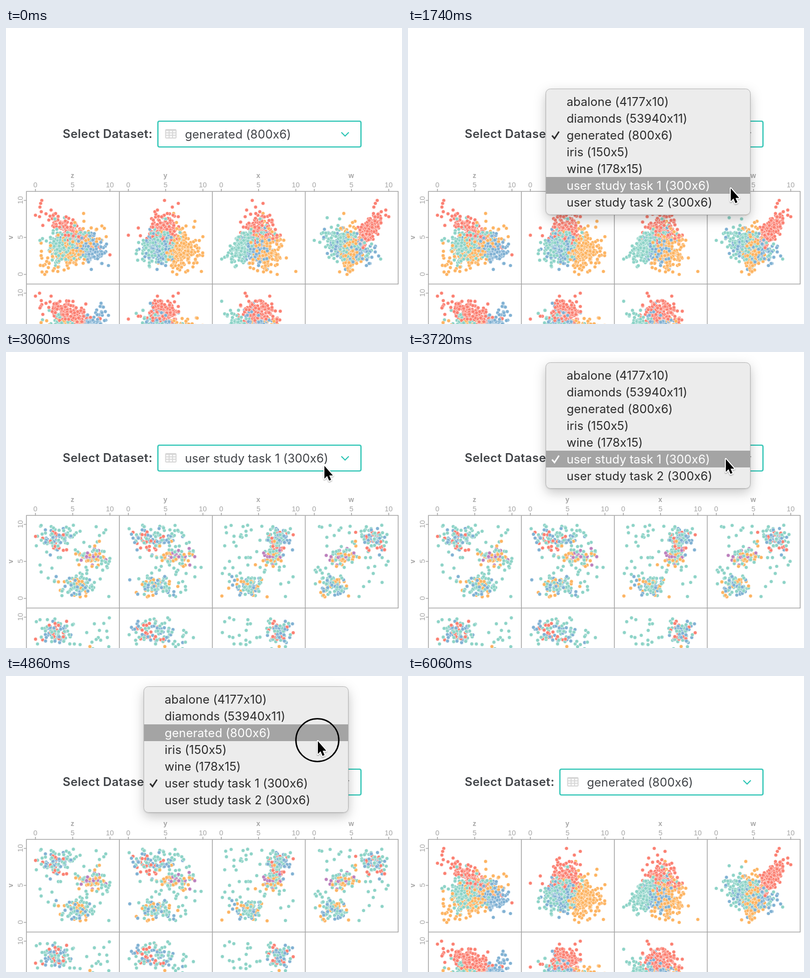
An HTML page with a canvas that plays this animation: 800 px wide and 600 px high, repeating every 6.12 s.

```html
<!DOCTYPE html>
<html lang="en">
<head>
<meta charset="utf-8">
<title>Dataset picker</title>
<style>
html, body { margin: 0; width: 100%; height: 100%; overflow: hidden; background: #fff; }
canvas, svg { position: absolute; left: 0; top: 0; width: 800px; height: 600px; }
svg { overflow: hidden; }
text { font: 24px Inter, "Open Sans", sans-serif; letter-spacing: .08px; fill: #404347; white-space: pre; }
.label { font-weight: 600; letter-spacing: .38px; }
.axis text { font: 14.5px "Liberation Sans", Arial, sans-serif; letter-spacing: 0; fill: #a6a6a6; text-anchor: middle; }
.axis .name { font-weight: bold; font-size: 14px; }
.axis path { fill: none; stroke: #a6a6a6; stroke-width: 1.6; }
#items text { fill: #2b2b2b; }
#items .on { fill: #fff; }
</style>
</head>
<body>
<svg id="stage" viewBox="0 0 800 600">
  <defs>
    <filter id="menuShadow" x="-20%" y="-20%" width="140%" height="150%">
      <feDropShadow dx="0" dy="8" stdDeviation="12" flood-color="#000" flood-opacity=".2"/>
      <feDropShadow dx="0" dy="1" stdDeviation="1" flood-color="#000" flood-opacity=".15"/>
    </filter>
    <filter id="arrowShadow" x="-50%" y="-50%" width="200%" height="200%">
      <feDropShadow dx="0" dy="1.5" stdDeviation="1.3" flood-color="#000" flood-opacity=".35"/>
    </filter>
  </defs>
  <g id="axes" class="axis"></g>

  <text class="label" x="114.5" y="223">Select Dataset:</text>
  <rect x="305" y="187" width="414" height="56" rx="5" fill="#c9f1ec"/>
  <rect x="307" y="189" width="410" height="52" rx="3" fill="#fff" stroke="#2bc4b4" stroke-width="2.200"/>
  <g fill="none" stroke="#d6d6d6" stroke-width="2">
    <rect x="322.500" y="206" width="21" height="17" rx="1.500"/>
    <path d="M322 207.500h22M322 212.500h22M322 217.500h22M329.500 206v17M336.500 206v17"/>
  </g>
  <text id="value" x="361.500" y="224"></text>
  <path id="chevron" d="M677.500 211.500l7.500 7.500 7.500-7.500" fill="none" stroke-width="2.200"/>

  <g id="loader">
    <rect x="127" y="278" width="578" height="96" rx="4" fill="#edefee"/>
    <g id="spinner" fill="#404347"></g>
    <text id="status" x="192.500" y="334"></text>
  </g>

  <g id="menu">
    <rect x="278.500" y="123.500" width="413" height="255" rx="9" fill="#ececec" stroke="#b4b4b4" filter="url(#menuShadow)"/>
    <rect id="bar" x="279" width="412" height="34" fill="#a4a4a4"/>
    <g id="items"></g>
    <path id="check" d="M291 1l5 6 9-14" fill="none" stroke-width="3"/>
  </g>

  <g id="cursor">
    <circle id="ring" r="43.300" fill="none" stroke="#000" stroke-width="2.800"/>
    <path d="M1 2V28L6.500 22.500 10.500 32 14.500 30.300 10.700 21.500H18Z" stroke="#fff" stroke-width="4"
      stroke-linejoin="round" paint-order="stroke" filter="url(#arrowShadow)"/>
  </g>
</svg>
<script>
const LOOP = 6120, STEP = 60, ROW = 34;
const $ = id => document.getElementById(id);
const show = (el, on) => { el.style.display = on ? '' : 'none'; };

const TEAL = '#8dd3c7', RED = '#fb8072', BLUE = '#80b1d3', ORANGE = '#fdb462', PURPLE = '#bc80bd';
const options = ['abalone (4177x10)', 'diamonds (53940x11)', 'generated (800x6)', 'iris (150x5)',
  'wine (178x15)', 'user study task 1 (300x6)', 'user study task 2 (300x6)'];

// Scales of the scatter plot matrix
const CELL = 187.75;
const px = (v, col) => 59.5 + CELL * col + v * 15.05;
const py = (v, row) => 499.5 + 188 * row - v * 15;

function seeded(a) {
  return () => {
    a = a + 0x6D2B79F5 | 0;
    let n = Math.imul(a ^ a >>> 15, 1 | a);
    n = n + Math.imul(n ^ n >>> 7, 61 | n) ^ n;
    return ((n ^ n >>> 14) >>> 0) / 4294967296;
  };
}

// Each point is [color, z, y, x, w, v]
function collect(rand, groups) {
  const normal = (mean, sd) =>
    mean + sd * Math.sqrt(-2 * Math.log(1 - rand())) * Math.cos(2 * Math.PI * rand());
  const points = [];
  for (const [count, make] of groups) {
    for (let left = count; left > 0;) {
      const p = make(normal);
      if (p.slice(1).every(v => v >= 0 && v <= 10)) { points.push(p); left--; }
    }
  }
  for (let i = points.length - 1; i > 0; i--) {
    const j = Math.floor(rand() * (i + 1));
    [points[i], points[j]] = [points[j], points[i]];
  }
  return points;
}

function generated() {
  return collect(seeded(11), [
    [175, n => {
      const v = n(5.8, 1.05);
      return [RED, n(4.7 - 1.1 * (v - 6), .9), n(4.7, .95), n(5, 1.05), n(7.3 + .5 * (v - 6), .6), v];
    }],
    [215, n => {
      const z = n(4.8, 2);
      return [ORANGE, z, n(7, 1.15), n(5.8, 1), n(4.8, .6), n(3.3 + .4 * (z - 4.5), 1.15)];
    }],
    [225, n => {
      const x = n(3.2, 1.15), w = n(4.4 - .8 * (x - 3), 1.1);
      return [TEAL, n(4.1 - .3 * (w - 4.4), 1.4), n(4 - .25 * (w - 4.4), 1), x, w, n(3.8 + .65 * (x - 3), 1)];
    }],
    [172, n => {
      const z = n(7.1, 1.15);
      return [BLUE, z, n(4.2, 1), n(4.9, .9), n(4.9 + .8 * (z - 7.1), 1.1), n(3.6 - .3 * (z - 7.1), .95)];
    }]
  ]).concat([
    [RED, .85, 4.85, 4.15, 8.45, 10], [RED, .7, 6.7, 5.6, 8.2, 9.6], [RED, .6, 5.9, 4.6, 8, 9.1],
    [RED, 2.1, 3.9, 3.4, 9.6, 8.7], [RED, 0, 6, 6.5, 9.6, 8], [RED, .55, 6.7, 3.2, 10, 7.8],
    [RED, 4, 0, 6, 6.5, 5.3], [ORANGE, 9.5, 10, 5.5, 4.6, 5.1], [ORANGE, 3, 9.8, 10, 4.8, .4],
    [TEAL, 2.6, 5, 5.2, 3.4, 7.5], [TEAL, .6, 2, 3, 0, 4.6], [BLUE, 9.8, 5, 5, 7, 1.2],
    [ORANGE, 1.25, 6.5, 7.5, 4.4, 0]
  ]);
}

function studyTask() {
  const rand = seeded(29);
  const pick = (a, b) => { const r = rand(); return r < .42 ? TEAL : r < .72 ? a : b; };
  const any = () => rand() * 10;
  return collect(rand, [
    [82, n => [pick(BLUE, RED), n(2.6, 1.1), n(3.3, 1.5), n(7.8, .8), n(8.1, .85), n(8.2, .85)]],
    [82, n => [pick(ORANGE, PURPLE), n(7.7, 1), n(6.4, 1.3), n(7, .75), n(4, 1), n(5.7, .65)]],
    [88, n => [pick(BLUE, ORANGE), n(5.6, 1.2), n(3.8, 1.4), n(3.6, 1), n(2.7, .85), n(1.5, .8)]],
    [48, () => [TEAL, any(), any(), any(), any(), any()]]
  ]);
}

function plot(points) {
  const canvas = document.createElement('canvas');
  canvas.width = 800;
  canvas.height = 600;
  const ctx = canvas.getContext('2d');
  ctx.strokeStyle = '#fff';
  ctx.lineWidth = .6;
  for (const p of points) {
    ctx.fillStyle = p[0];
    for (let row = 0; row < 2; row++) {
      for (let col = 0; col < 4 - row; col++) {
        const y = py(p[5 - row], row);
        if (y > 606) continue;
        ctx.beginPath();
        ctx.arc(px(p[1 + col], col), y, 3.6, 0, 7);
        ctx.fill();
        ctx.stroke();
      }
    }
  }
  document.body.insertBefore(canvas, $('stage'));
  return canvas;
}

function buildAxes() {
  const edge = i => 41.3 + CELL * i;
  let lines = 'M40.5 331.300H793M40.5 519H793M' + edge(4) + ' 331V519', labels = '';
  for (let i = 0; i < 4; i++) {
    lines += `M${edge(i)} 331V720`;
    labels += `<text class="name" x="${px(5, i) - .5}" y="304">${'zyxw'[i]}</text>`;
    for (const v of [0, 5, 10]) {
      lines += `M${px(v, i)} 326v5`;
      labels += `<text x="${px(v, i) - .3}" y="323">${v}</text>`;
    }
  }
  const upright = (x, y, s, cls = '') =>
    `<text class="${cls}" transform="translate(${x} ${y}) rotate(-90)">${s}</text>`;
  for (const row of [0, 1]) {
    for (const v of [0, 5, 10]) {
      lines += `M36 ${py(v, row)}h5`;
      labels += upright(33.5, py(v, row) - .5, v);
    }
    labels += upright(14, py(5, row), 'vw'[row], 'name');
  }
  $('axes').innerHTML = `<path d="${lines}"/>` + labels;
}

buildAxes();
$('items').innerHTML = options.map((s, i) => `<text x="320.5" y="${158 + ROW * i}">${s}</text>`).join('');
$('spinner').innerHTML = Array.from({ length: 8 }, (_, i) => {
  const a = i * Math.PI / 4;
  return `<circle cx="${174.5 + 9.7 * Math.cos(a)}" cy="${325 + 9.7 * Math.sin(a)}" r="${1.4 + i * .25}"/>`;
}).join('');
const plots = { generated: plot(generated()), task: plot(studyTask()) };

const path = [[0, 802, 560], [600, 664, 212], [660, 664, 212], [840, 663, 206], [1140, 663, 206],
  [1680, 651, 323], [2640, 651, 323], [3180, 641, 215], [3900, 641, 215], [4620, 629, 130],
  [5040, 629, 130], [5460, 640, 640]];
const clicks = [660, 1860, 3240, 4740], CLICK = 300;
const menus = [
  { open: 720, pick: 1860, close: 2160, dy: 0, checked: 2, choice: 5 },
  { open: 3300, pick: 4740, close: 5220, dy: -102, checked: 5, choice: 2 }
];
const FADE = 120;
const within = (t, a, b) => t >= a && t < b;

function cursorAt(t) {
  const i = path.findIndex(k => k[0] > t);
  if (i < 0) return path[path.length - 1].slice(1);
  const [t0, x0, y0] = path[i - 1], [t1, x1, y1] = path[i];
  const u = (t - t0) / (t1 - t0), e = u * u * (3 - 2 * u);
  return [x0 + (x1 - x0) * e, y0 + (y1 - y0) * e];
}

function drawMenu(t, y) {
  const m = menus.find(m => within(t, m.open, m.close + FADE));
  show($('menu'), m);
  $('chevron').setAttribute('stroke', m ? '#444' : '#2bc4b4');
  if (!m) return;
  const hover = t >= m.pick ? m.choice : Math.floor((y - 132 - m.dy) / ROW);
  $('menu').setAttribute('transform', `translate(0 ${m.dy})`);
  $('menu').style.opacity = Math.min(1, 1 - (t - m.close) / FADE);
  $('bar').setAttribute('y', 132 + ROW * hover);
  [...$('items').children].forEach((el, i) => el.classList.toggle('on', i === hover));
  $('check').setAttribute('transform', `translate(0 ${217 + ROW * (m.checked - 2)})`);
  $('check').setAttribute('stroke', hover === m.checked ? '#fff' : '#2b2b2b');
}

function draw(now) {
  const t = Math.floor(now % LOOP / STEP) * STEP;
  const [x, y] = cursorAt(t);
  const loading = within(t, 2340, 2580) || within(t, 5520, 6060);
  const task = within(t, 2340, 5520);

  show(plots.generated, !loading && !task);
  show(plots.task, !loading && task);
  show($('loader'), loading);
  $('axes').setAttribute('transform', `translate(0 ${loading ? 132 : 0})`);
  $('value').textContent = options[within(t, 2220, 5280) ? 5 : 2];
  $('status').textContent = `Prerendering ${task ? 300 : 800} rows and 5 columns...`;

  drawMenu(t, y);
  $('cursor').setAttribute('transform', `translate(${x} ${y})`);
  show($('ring'), clicks.some(c => within(t, c, c + CLICK)));
}

function tick() {
  draw(performance.now());
  requestAnimationFrame(tick);
}
tick();
</script>
</body>
</html>
```
